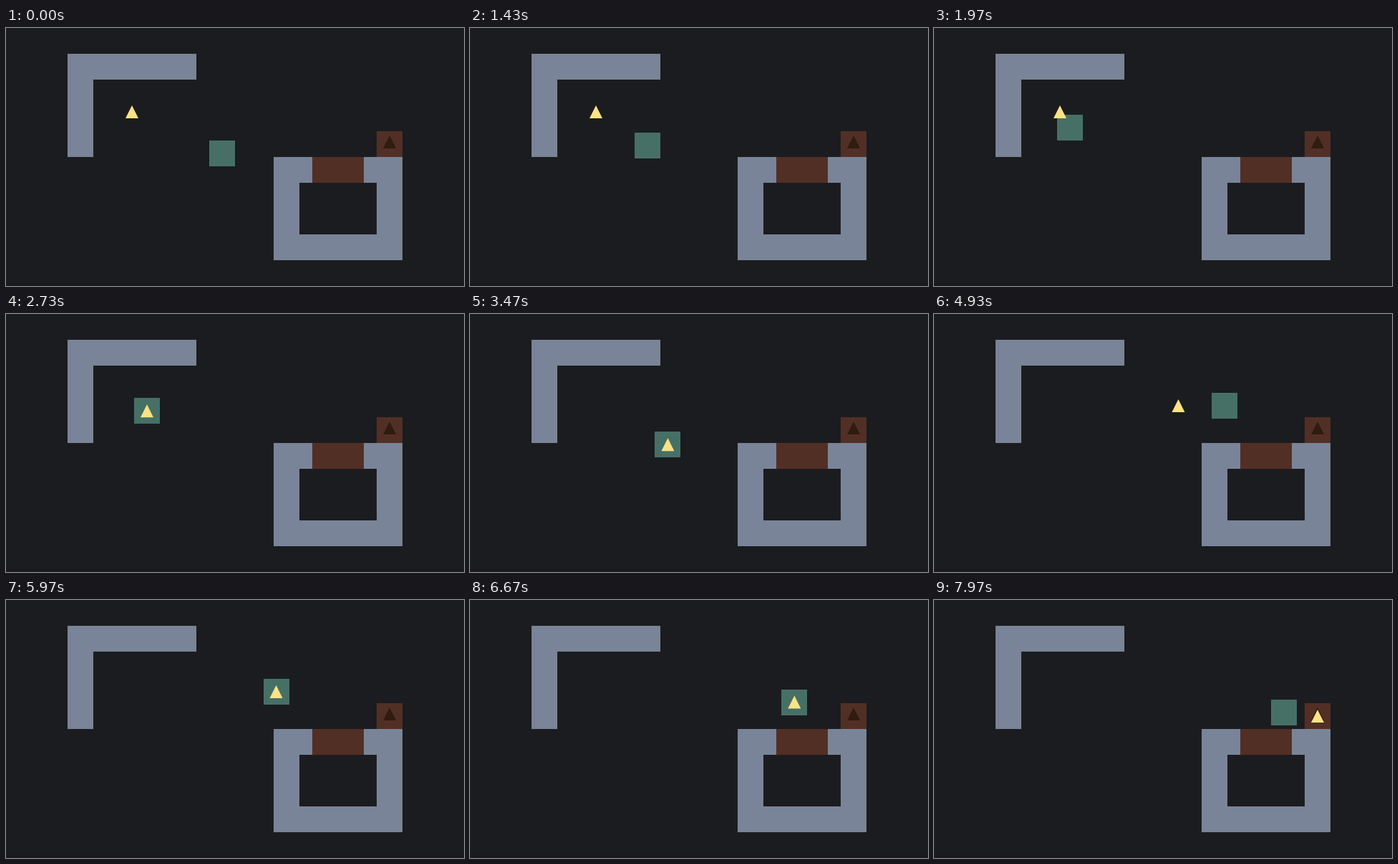
Recreate the animation shown at these times as an HTML page with a canvas. Size 640 px wide and 360 px high, loop 8 s.

```html
<!DOCTYPE html>
<html>
<head>
<meta charset="utf-8">
<style>
  html, body { margin: 0; height: 100%; overflow: hidden; background: #1b1c1f; }
  canvas { display: block; }
</style>
</head>
<body>
<canvas width="640" height="360"></canvas>
<script>
const ctx = document.querySelector('canvas').getContext('2d');
const LOOP = 8000, TICKS_PER_MS = 0.03, SPEED = 3.61, CELL = 36;
const WALL = '#7a8498', FLOOR = '#1b1c1f', DOOR = '#522f25';

// The player walks at one speed while an arrow key is down, from one tick to another.
const presses = {
  left: [[29, 62], [150, 156], [162, 170], [237, 240]],
  right: [[79, 123], [131, 149], [174, 214]],
  up: [[41, 51], [63, 67], [104, 120]],
  down: [[80, 97], [197, 205]]
};
const PICK = 76, DROP = 123, PICK_AGAIN = 170, UNLOCK = 227;

function walked(direction, tick) {
  return presses[direction].reduce((sum, [from, to]) =>
    sum + SPEED * Math.max(0, Math.min(tick + 1, to) - from), 0);
}

function player(tick) {
  return [
    283.7 + walked('right', tick) - walked('left', tick),
    157 + walked('down', tick) - walked('up', tick)
  ];
}

function keyCenter(tick) {
  if (tick < PICK) return [176, 117];
  if (tick >= UNLOCK) return [536, 162];
  const lying = tick >= DROP && tick < PICK_AGAIN;
  return player(lying ? DROP : tick).map(v => v + CELL / 2);
}

function rect(color, x, y, w, h) {
  ctx.fillStyle = color;
  ctx.fillRect(x, y, w, h);
}

function triangle(color, x, y) {
  ctx.fillStyle = color;
  ctx.beginPath();
  ctx.moveTo(x, y - 9);
  ctx.lineTo(x + 9, y + 9);
  ctx.lineTo(x - 9, y + 9);
  ctx.fill();
}

function drawRoom() {
  rect(FLOOR, 0, 0, 640, 360);
  rect('#191a1d', 0, 356, 640, 4);
  rect(WALL, 86, 36, 5 * CELL, CELL);
  rect(WALL, 86, 72, CELL, 3 * CELL);
  rect(WALL, 374, 180, 5 * CELL, 4 * CELL);
  rect(FLOOR, 410, 216, 3 * CELL, 2 * CELL);
  rect(DOOR, 428, 180, 2 * CELL, CELL);
  rect(DOOR, 518, 144, CELL, CELL);
  triangle('#2f1c0f', 536, 159);
}

function draw() {
  const tick = Math.floor((performance.now() % LOOP + 4) * TICKS_PER_MS);
  const [x, y] = player(tick).map(Math.round);
  drawRoom();
  rect('#467066', x, y, CELL, CELL);
  triangle('#fde285', ...keyCenter(tick));
  requestAnimationFrame(draw);
}
draw();
</script>
</body>
</html>
```
